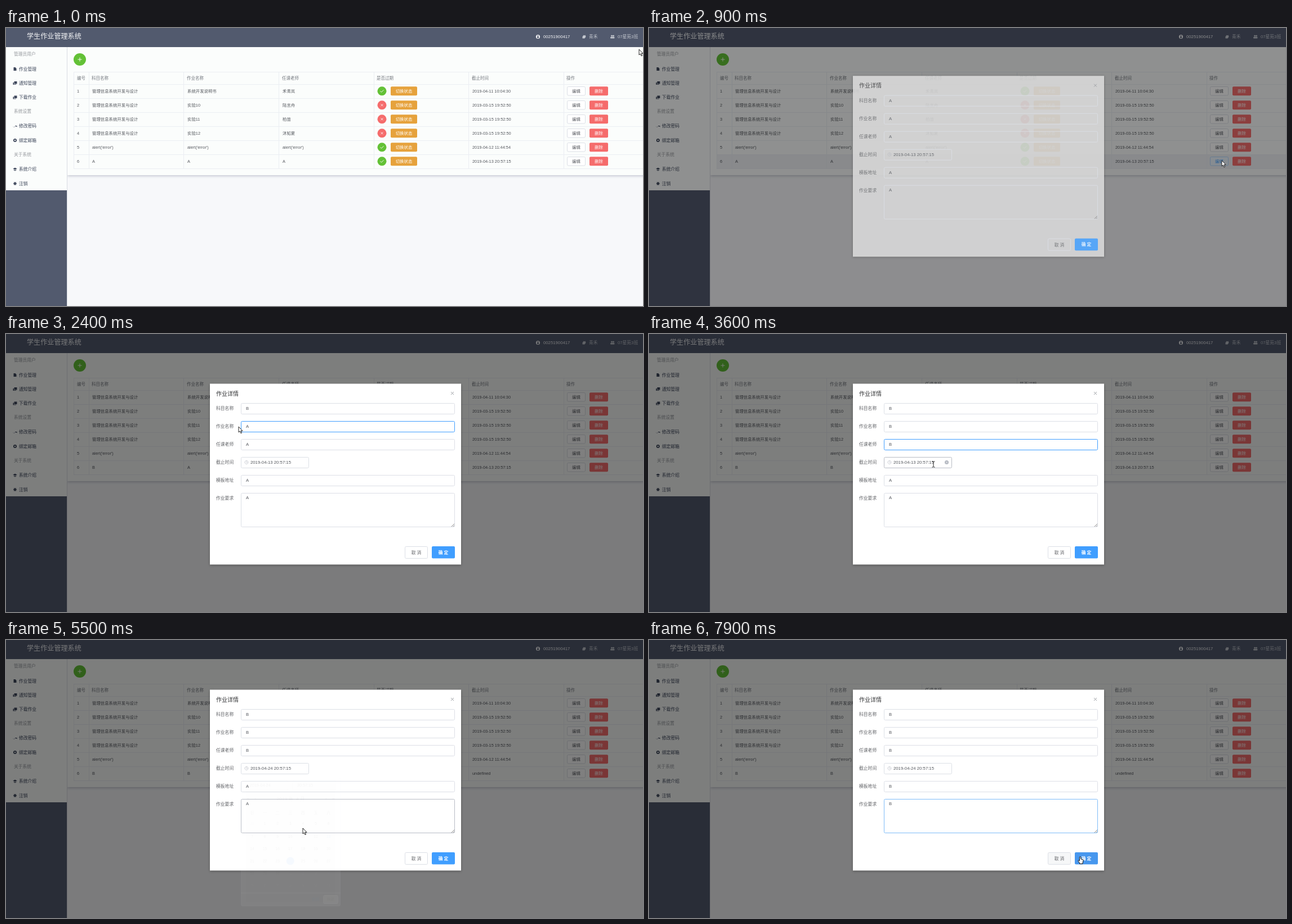
Write an HTML page with a canvas that moves like this. It is 1131 px wide and 495 px high and loops after 8000 ms.

```html
<!DOCTYPE html>
<html lang="zh">
<head>
<meta charset="utf-8">
<style>
  html, body { margin: 0; width: 100%; height: 100%; overflow: hidden; }
  canvas { display: block; }
</style>
</head>
<body>
<canvas id="stage" width="1131" height="495"></canvas>
<script>
const ctx = document.getElementById('stage').getContext('2d');
const LOOP = 8000, BLUE = '#409eff', GREEN = '#63c136', RED = '#f56c6c', ORANGE = '#e6a23c';
const DARK = '#525a6e', PAPER = '#fbfdfc', LINE = '#ebeef3', BORDER = '#dcdfe6', BODY = '#55585e';

// pointer path: time, x, y
const PATH = [
  [0, 1124, 38], [600, 1018, 236], [900, 1017, 236], [1400, 518, 136], [1500, 518, 136],
  [1750, 436, 134], [1920, 394, 141], [2080, 394, 141], [2300, 440, 165], [2450, 404, 165],
  [2600, 404, 165], [2780, 440, 198], [2920, 408, 206], [3100, 408, 206], [3550, 505, 232],
  [3750, 505, 232], [4250, 505, 394], [4600, 505, 394], [5200, 574, 462], [5400, 574, 462],
  [5500, 527, 335], [5600, 527, 335], [6200, 440, 262], [6400, 440, 262], [6550, 384, 262],
  [6660, 384, 262], [6850, 440, 293], [6980, 398, 308], [7200, 433, 300], [7700, 765, 387], [8000, 765, 387]
];

// form fields: label, top, height, width, press / select / change times
const FIELDS = [
  ['科目名称', 123, 20, 380, 1750, 1900, 2050],
  ['作业名称', 155, 20, 380, 2300, 2430, 2600],
  ['任课老师', 187, 20, 380, 2780, 2900, 3050],
  ['截止时间', 219, 20, 121, 3700, 9000, 4350],
  ['模板地址', 251, 20, 380, 6400, 6530, 6650],
  ['作业要求', 283, 61, 380, 6850, 6960, 7050]
].map(([label, y, h, w, press, select, change]) => ({ label, y, h, w, press, select, change }));
FIELDS.forEach((f, i) => f.blur = i === 3 ? 5450 : i === 5 ? LOOP : FIELDS[i + 1].press);

const COURSE = '管理信息系统开发与设计';
const ROWS = [
  [COURSE, '系统开发说明书', '禾青岚', true, '2019-04-11 10:04:30'],
  [COURSE, '实验10', '陆言舟', false, '2019-03-15 19:52:50'],
  [COURSE, '实验11', '柏苗', false, '2019-03-15 19:52:50'],
  [COURSE, '实验12', '沐知夏', false, '2019-03-15 19:52:50'],
  ["alert('error')", "alert('error')", "alert('error')", true, '2019-04-12 11:44:54']
];

const clamp = v => Math.max(0, Math.min(1, v));
const inside = (p, x, y, w, h) => p.x >= x && p.x <= x + w && p.y >= y && p.y <= y + h;

function text(s, x, y, color = BODY, size = 7.75, align = 'left', weight = '') {
  ctx.font = `${weight} ${size}px "Liberation Sans", "Noto Sans CJK SC", "Noto Sans CJK", sans-serif`;
  ctx.textAlign = align;
  ctx.textBaseline = 'alphabetic';
  ctx.fillStyle = color;
  ctx.fillText(s, x, y + size * .36);
}
function rect(x, y, w, h, fill, stroke, r = 0) {
  ctx.beginPath();
  ctx.roundRect(x, y, w, h, r);
  if (fill) { ctx.fillStyle = fill; ctx.fill(); }
  if (stroke) { ctx.strokeStyle = stroke; ctx.lineWidth = 1; ctx.stroke(); }
}
function disc(x, y, r, fill) {
  ctx.beginPath();
  ctx.arc(x, y, r, 0, 7);
  ctx.fillStyle = fill;
  ctx.fill();
}
function path(d, x, y, stroke, width = 1, fill) {
  const p = new Path2D(d);
  ctx.save();
  ctx.translate(x, y);
  if (fill) { ctx.fillStyle = fill; ctx.fill(p); }
  if (stroke) { ctx.strokeStyle = stroke; ctx.lineWidth = width; ctx.stroke(p); }
  ctx.restore();
}
function shadowed(blur, color, draw) {
  ctx.save();
  ctx.shadowBlur = blur;
  ctx.shadowColor = color;
  ctx.shadowOffsetY = 1;
  draw();
  ctx.restore();
}
function button(label, x, y, w, h, fill, stroke, color, size = 7.4, weight = '') {
  rect(x, y, w, h, fill, stroke, 2);
  text(label, x + w / 2, y + h / 2, color, size, 'center', weight);
}

function pointerAt(t) {
  const i = Math.max(1, PATH.findIndex(k => k[0] > t));
  const [a, b] = [PATH[i - 1], PATH[i]];
  let u = (t - a[0]) / (b[0] - a[0]);
  u = u * u * (3 - 2 * u);
  return { x: a[1] + (b[1] - a[1]) * u, y: a[2] + (b[2] - a[2]) * u };
}

const ICONS = {
  file: 'M-2.5-3H.5L2.5-1V3H-2.5Z',
  books: 'M-1.5-3H3.5V1.5H-1.5ZM-3.5-1H-2V2.3H2V3H-3.5Z',
  key: 'M-3.5 0a1.8 1.8 0 1 0 3.4-.6H3.5V1.5H2.3V.5H0A1.8 1.8 0 0 1-3.5 0Z',
  cap: 'M-3.7-1L0-2.8 3.7-1 0 .8ZM-2.2.7L0 1.8 2.2.7V2L0 3-2.2 2Z',
  flake: 'M-3 0H3M-1.5-2.6L1.5 2.6M1.5-2.6L-1.5 2.6'
};
const MENU = [
  [46, '管理员用户'], [73, '作业管理', 'file'], [98, '通知管理', 'books'], [123.5, '下载作业', 'books'],
  [148, '系统设置'], [174.5, '修改密码', 'key'], [200, '绑定邮箱', 'gear'],
  [225, '关于系统'], [251.5, '系统介绍', 'cap'], [277, '注销', 'flake']
];

function drawMenu() {
  rect(0, 34, 109, 461, DARK);
  rect(0, 34, 108, 255, PAPER);
  rect(108, 34, 1, 461, '#d9dce3');
  for (const [y, label, icon] of MENU) {
    text(label, icon ? 23 : 14, y, icon ? '#3d465a' : '#96999e');
    if (icon === 'gear') {
      disc(16, y, 3, '#3d465a');
      disc(16, y, 1.2, PAPER);
    } else if (icon === 'flake') {
      path(ICONS.flake, 16, y, '#3d465a', 1.4);
    } else if (icon) {
      path(ICONS[icon], 16, y, null, 0, '#3d465a');
    }
  }
}

function drawHeader() {
  rect(0, 0, 1131, 34, DARK);
  text('学生作业管理系统', 37, 15, '#f4f5f7', 12.1);
  disc(944.5, 15.5, 3.6, '#f0f1f4');
  disc(944.5, 14.5, 1.2, DARK);
  rect(943, 16, 3, 2, DARK);
  text('00251900417', 954, 15, '#f4f5f7');
  path('M-3 0L-1-3 0-2 2-3 3 0 1 3-3 3Z', 1026.5, 15.5, null, 0, '#c3c7cf');
  text('青禾', 1035, 15, '#c3c7cf');
  disc(1075.5, 14, 1.5, '#c3c7cf');
  disc(1078.5, 14, 1.5, '#c3c7cf');
  rect(1073, 16, 7.5, 2.5, '#c3c7cf', null, 1);
  text('07星苑3班', 1086, 15, '#c3c7cf');
}

function drawTable(t, pointer, open) {
  shadowed(5, 'rgba(60,70,100,.35)', () => rect(109, 34, 1030, 228, PAPER));
  disc(131, 56, 11, GREEN);
  path('M-3.5 0H3.5M0-3.5V3.5', 131, 56, '#fff', .9);

  const value = i => t >= FIELDS[i].change ? 'B' : 'A';
  const last = [value(0), value(1), value(2), true, t < FIELDS[3].change ? '2019-04-13 20:57:15' : 'undefined'];
  const rows = [...ROWS, last];

  rows.forEach((_, i) => {
    if (open < 1 && inside(pointer, 120, 100 + i * 25, 1011, 24.9)) rect(120, 100 + i * 25, 1011, 25, '#f0f2f6');
  });
  for (let y = 78; y < 251; y += y === 78 ? 22 : 25) rect(120, y, 1011, 1, LINE);
  for (const x of [120, 147, 315, 484, 653, 821, 990]) rect(x, 78, 1, 172, LINE);
  [['编号', 126], ['科目名称', 152], ['作业名称', 321], ['任课老师', 490], ['是否过期', 658], ['截止时间', 827], ['操作', 995]]
    .forEach(([s, x]) => text(s, x, 89, '#74787f', 7.5));

  rows.forEach(([course, task, teacher, ok, due], i) => {
    const y = 112.3 + i * 25;
    [[i + 1, 126], [course, 153], [task, 322], [teacher, 491], [due, 828]]
      .forEach(([s, x]) => text(s, x, y, BODY, 7.4));
    disc(667.5, y, 8, ok ? GREEN : RED);
    path(ok ? 'M-3 0L-1 2 3-2' : 'M-2-2L2 2M2-2L-2 2', 667.5, y, '#fff', .9);
    button('切换状态', 683, y - 8, 47, 16, ORANGE, null, '#fff');
    const focused = i === 5 && t > 700 && t < 1750;
    const lit = focused || (open < 1 && inside(pointer, 996, y - 8, 33, 16));
    const edge = lit ? (t < 850 ? '#7cb5f2' : '#b3d8ff') : BORDER;
    button('编辑', 996.5, y - 7.8, 32, 15.5, lit ? '#ecf5ff' : '#fff', edge, lit ? BLUE : BODY);
    button('删除', 1036, y - 8, 33, 16, RED, null, '#fff');
  });
}

function drawDialog(t, pointer, open) {
  ctx.save();
  ctx.globalAlpha = open;
  ctx.translate(0, -20 * (1 - open));
  const white = 255 - 160 * (1 - open);
  shadowed(4, 'rgba(0,0,0,.3)', () => rect(362, 88.5, 446, 322, `rgb(${white},${white},${white})`));
  text('作业详情', 373, 106, '#303133', 10);
  path('M-2.5-2.5L2.5 2.5M2.5-2.5L-2.5 2.5', 792.5, 105.5, '#909399', .9);

  FIELDS.forEach((f, i) => {
    const y = i === 5 ? 291 : f.y + 9.5;
    const focused = t >= f.press && t < f.blur;
    const hover = open === 1 && inside(pointer, 417, f.y, f.w, f.h);
    const edge = focused ? (t > 7870 ? '#7fbcf8' : BLUE) : hover ? '#b8bcc5' : BORDER;
    text(f.label, 373, y + (i === 5 ? 1 : 0), '#606266', 7.8);
    rect(417.5, f.y + .5, f.w - 1, f.h - 1, null, edge, 2);
    if (i === 3) {
      path('M3 0A3 3 0 1 1 3-.1M0-2V.3H1.6', 427, y, '#b5b9c2', .7);
      text(t < f.change ? '2019-04-13 20:57:15' : '2019-04-24 20:57:15', 434, y);
      if (hover) {
        disc(528.5, y, 3.5, '#b5b9c2');
        path('M-1.2-1.2L1.2 1.2M1.2-1.2L-1.2 1.2', 528.5, y, '#fff', .7);
      }
      return;
    }
    const selected = t >= f.select && t < f.change;
    if (selected) rect(425.5, y - 5, 6, 10, '#3390ff');
    text(t < f.change ? 'A' : 'B', 426, y, selected ? '#fff' : BODY);
    if (focused && t >= f.change && (t - f.change) % 1000 < 500) rect(431.5, y - 4, .7, 8, '#333');
  });
  path('M-5 0L0-5M-2 0L0-2', 796, 343, '#666', .8);

  button('取 消', 708.5, 378.5, 40, 21, t > 7600 ? '#f6f7f8' : null, BORDER, '#606266', 7.75);
  button('确 定', 756, 378, 41, 21.5, t > 7870 ? '#4797ee' : t > 7620 ? '#66b1ff' : BLUE, null, '#fff', 7.75, 'bold');
  ctx.restore();
}

function drawPicker(t) {
  const grow = clamp((t - 3750) / 250), alpha = Math.min(grow, clamp((5505 - t) / 85));
  if (!alpha) return;
  const picked = t < FIELDS[3].change ? 13 : 24;
  ctx.save();
  ctx.globalAlpha = alpha;
  ctx.translate(0, 245 * (1 - grow));
  ctx.scale(1, grow);
  shadowed(6, 'rgba(0,0,0,.12)', () => rect(417.5, 245.5, 176, 228, '#fff', '#e4e7ed', 2));
  rect(425.5, 250.5, 75, 17, null, BORDER, 2);
  rect(508.5, 250.5, 77, 17, null, BORDER, 2);
  text('2019-04-' + picked, 433, 258, BODY, 7.2);
  text('20:57:15', 517, 258, BODY, 7.2);
  rect(417, 272, 177, 1, '#e4e7ed');
  text('2019 年  4 月', 505.5, 283, BODY, 8.5, 'center');
  [['«', 430], ['‹', 443], ['›', 568], ['»', 581]].forEach(([s, x]) => text(s, x, 282, BODY, 9, 'center'));
  [...'日一二三四五六'].forEach((s, i) => text(s, 437 + i * 22.6, 308, BODY, 6.7, 'center'));
  rect(425, 318, 160, 1, LINE);
  for (let i = 0; i < 42; i++) {
    const x = 437 + i % 7 * 22.6, y = 327 + Math.floor(i / 7) * 22.2;
    const current = i > 0 && i < 31, day = i === 0 ? 31 : current ? i : i - 30;
    const chosen = current && day === picked;
    if (chosen) disc(x, y, 7, BLUE);
    text(day, x, y, chosen ? '#fff' : !current ? '#c0c4cc' : day === 13 ? BLUE : BODY, 6.7, 'center');
  }
  rect(417, 450, 177, 1, '#e4e7ed');
  text('此刻', 543, 462, BLUE, 6.7);
  button('确定', 563.5, 454.5, 26, 15, '#fff', BORDER, BODY, 6.7);
  ctx.restore();
}

function drawPointer(t, p, open) {
  const overField = open === 1 && FIELDS.some(f => inside(p, 417, f.y, f.w, f.h));
  const pickerOpen = t > 3800 && t < 5650;
  if (overField && !pickerOpen) {
    path('M-2.5-5H-.7L0-4.3 .7-5H2.5M0-4.3V4.3M-2.5 5H-.7L0 4.3 .7 5H2.5', p.x, p.y, '#222', 1);
  } else if (t > 7400 && inside(p, 756, 378, 41, 22)) {
    path('M0 0Q1.4-.6 1.8 .8V4L5 4.8Q6.3 5 6 7L5 11V12.5H-.5V11L-3 7.5Q-3.2 6-1.6 6.4L-.6 7.4V.8Q-.6 0 0 0Z', p.x, p.y - 1, '#111', 1, '#fff');
  } else {
    path('M0 0V10L2.3 8 4 11.8 5.6 11.1 4 7.4H7Z', p.x, p.y, '#111', .9, '#fff');
  }
}

function render(now) {
  const t = now % LOOP, pointer = pointerAt(t), open = clamp((t - 794) / 128);
  rect(0, 0, 1131, 495, '#f7f8fa');
  drawTable(t, pointer, open);
  drawMenu();
  drawHeader();
  if (open) {
    rect(0, 0, 1131, 495, `rgba(0,0,0,${.5 * open ** .8})`);
    drawDialog(t, pointer, open);
    drawPicker(t);
  }
  drawPointer(t, pointer, open);
}
function tick() {
  render(performance.now());
  requestAnimationFrame(tick);
}
tick();
</script>
</body>
</html>
```
